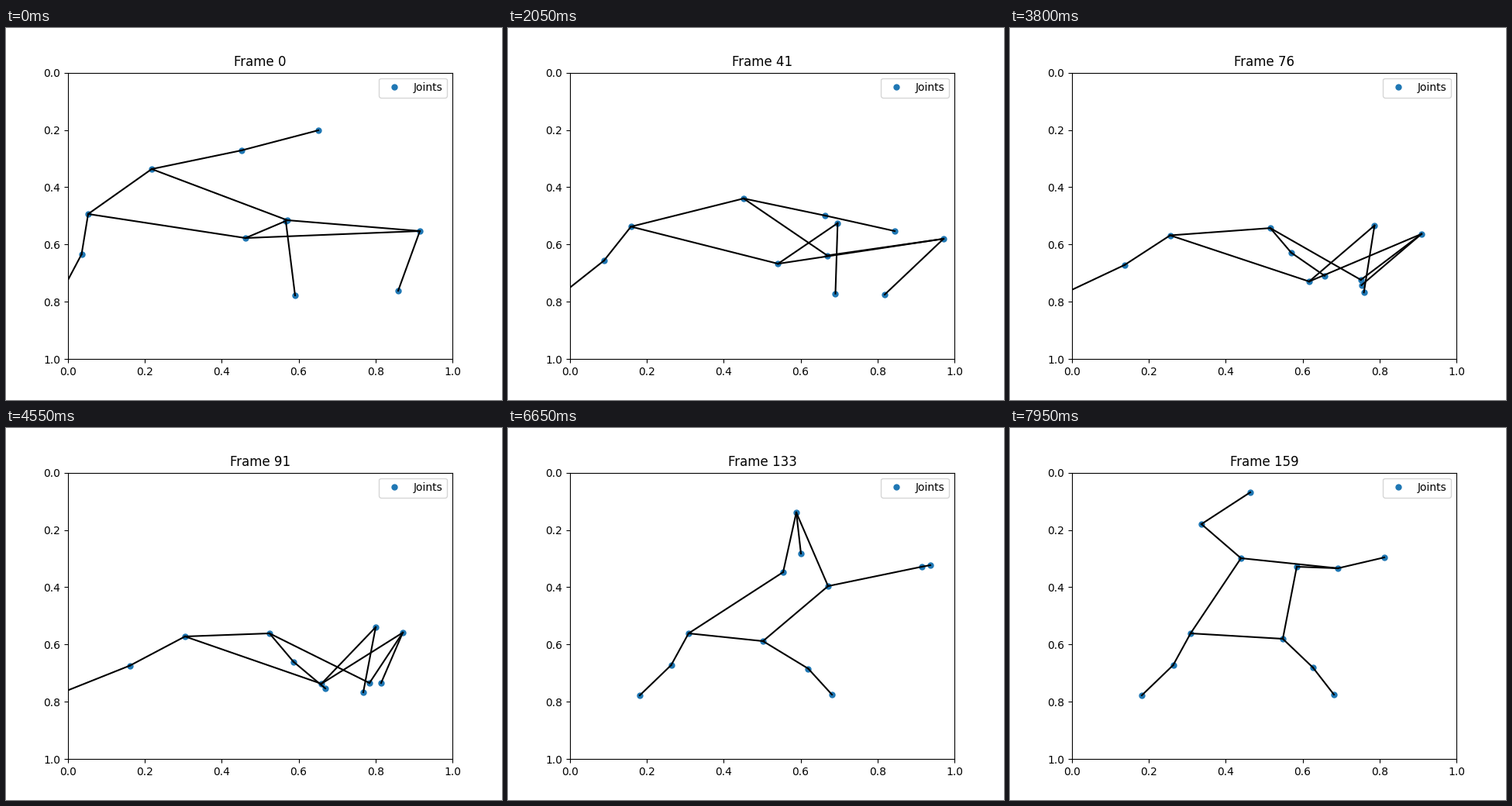
These frames come from a looping animation (640x480 px, 8000 ms). A matplotlib script:

```python
import numpy as np
import matplotlib.pyplot as plt
from matplotlib.animation import FuncAnimation

FRAMES, INTERVAL = 160, 50
WIDTH, HEIGHT = 640, 480

# Turning points of each free joint: {time step: (x, y)} in stage pixels.
# "a" and "b" are the body sides; the knees follow from hip and ankle.
PATHS = {
    "a_shoulder": {0: (309, 271), 91: (407, 330), 114: (469, 255), 133: (355, 186), 159: (298, 168)},
    "a_elbow": {0: (361, 249), 91: (477, 257), 114: (478, 305), 133: (372, 109), 159: (247, 124)},
    "a_wrist": {0: (373, 345), 91: (461, 341), 114: (421, 347), 133: (378, 162), 159: (310, 83)},
    "a_hip": {0: (106, 240), 91: (231, 269), 114: (285, 251), 133: (233, 265)},
    "a_ankle": {91: (71, 342), 114: (108, 338), 133: (170, 345)},
    "b_shoulder": {0: (363, 248), 91: (469, 329), 114: (491, 252), 133: (413, 204), 159: (370, 179)},
    "b_elbow": {0: (534, 262), 41: (562, 272), 91: (512, 264), 114: (483, 278),
                133: (534, 179), 159: (423, 181)},
    "b_wrist": {0: (506, 339), 41: (486, 344), 61: (423, 337), 91: (484, 329),
                114: (428, 330), 133: (545, 177), 159: (483, 167)},
    "b_hip": {0: (188, 182), 41: (304, 220), 91: (340, 265), 114: (314, 248),
              133: (329, 275), 159: (352, 272)},
    "b_ankle": {0: (403, 132), 41: (499, 262), 61: (400, 296), 91: (412, 336),
                114: (313, 343), 133: (418, 344)},
}
LIMBS = [("shoulder", "elbow"), ("elbow", "wrist"), ("shoulder", "hip"),
         ("hip", "knee"), ("knee", "ankle")]
BONES = [(f"{s}_{p}", f"{s}_{q}") for s in "ab" for p, q in LIMBS]
BONES.append(("a_hip", "b_hip"))
SWAPPED = range(125, 146)  # the cross link changes sides here


def glide(t, keys):
    """Smooth path through the keys without overshoot, held still outside them."""
    ts = np.array(list(keys), float)
    ps = np.array(list(keys.values()), float)
    h = np.diff(ts)[:, None]
    d = np.diff(ps, axis=0) / h
    prod, total = d[:-1] * d[1:], d[:-1] + d[1:]
    turn = prod <= 0
    inner = np.where(turn, 0, 2 * prod / np.where(turn, 1, total))
    m = np.vstack([d[:1], inner, d[-1:]])
    t = np.clip(t, ts[0], ts[-1])
    i = np.clip(np.searchsorted(ts, t, side="right") - 1, 0, len(h) - 1)
    u = (t - ts[i])[:, None] / h[i]
    v = 1 - u
    return (v * v * ((1 + 2 * u) * ps[i] + u * h[i] * m[i])
            + u * u * ((1 + 2 * v) * ps[i + 1] - v * h[i] * m[i + 1]))


steps = np.arange(FRAMES)
motion = {name: glide(steps, keys) for name, keys in PATHS.items()}

# Each knee sits halfway down the leg, pushed forward by its bend.
bends = {"a": np.full(FRAMES, 9.0),
         "b": 3 + 11 * np.cos(2 * np.pi * (steps - 20) / 115)}
for side, bend in bends.items():
    middle = (motion[f"{side}_hip"] + motion[f"{side}_ankle"]) / 2
    motion[f"{side}_knee"] = middle + np.column_stack([bend, np.ones(FRAMES)])

fig, ax = plt.subplots(figsize=(WIDTH / 100, HEIGHT / 100), dpi=100)
ax.set_xlim(0, 1)
ax.set_ylim(1, 0)
joints, = ax.plot([], [], "o", color="tab:blue", markersize=5, label="Joints")
bones = [ax.plot([], [], "k-", lw=1.5)[0] for _ in range(len(BONES) + 1)]
ax.legend(loc="upper right")
title = ax.set_title("Frame 0")

# Stage pixels to axes units
box = ax.get_position()
corner = np.array([box.x0 * WIDTH, (1 - box.y1) * HEIGHT])
extent = np.array([box.width * WIDTH, box.height * HEIGHT])
motion = {name: (path - corner) / extent for name, path in motion.items()}


def update(n):
    pose = {name: path[n] for name, path in motion.items()}
    joints.set_data(*np.array(list(pose.values())).T)
    cross = ("b_shoulder", "a_elbow") if n in SWAPPED else ("a_shoulder", "b_elbow")
    for line, (p, q) in zip(bones, BONES + [cross]):
        line.set_data(*np.array([pose[p], pose[q]]).T)
    title.set_text(f"Frame {n}")
    return [joints, *bones, title]


anim = FuncAnimation(fig, update, frames=FRAMES, interval=INTERVAL,
                     repeat=True, repeat_delay=0, blit=False)
plt.show()
```
